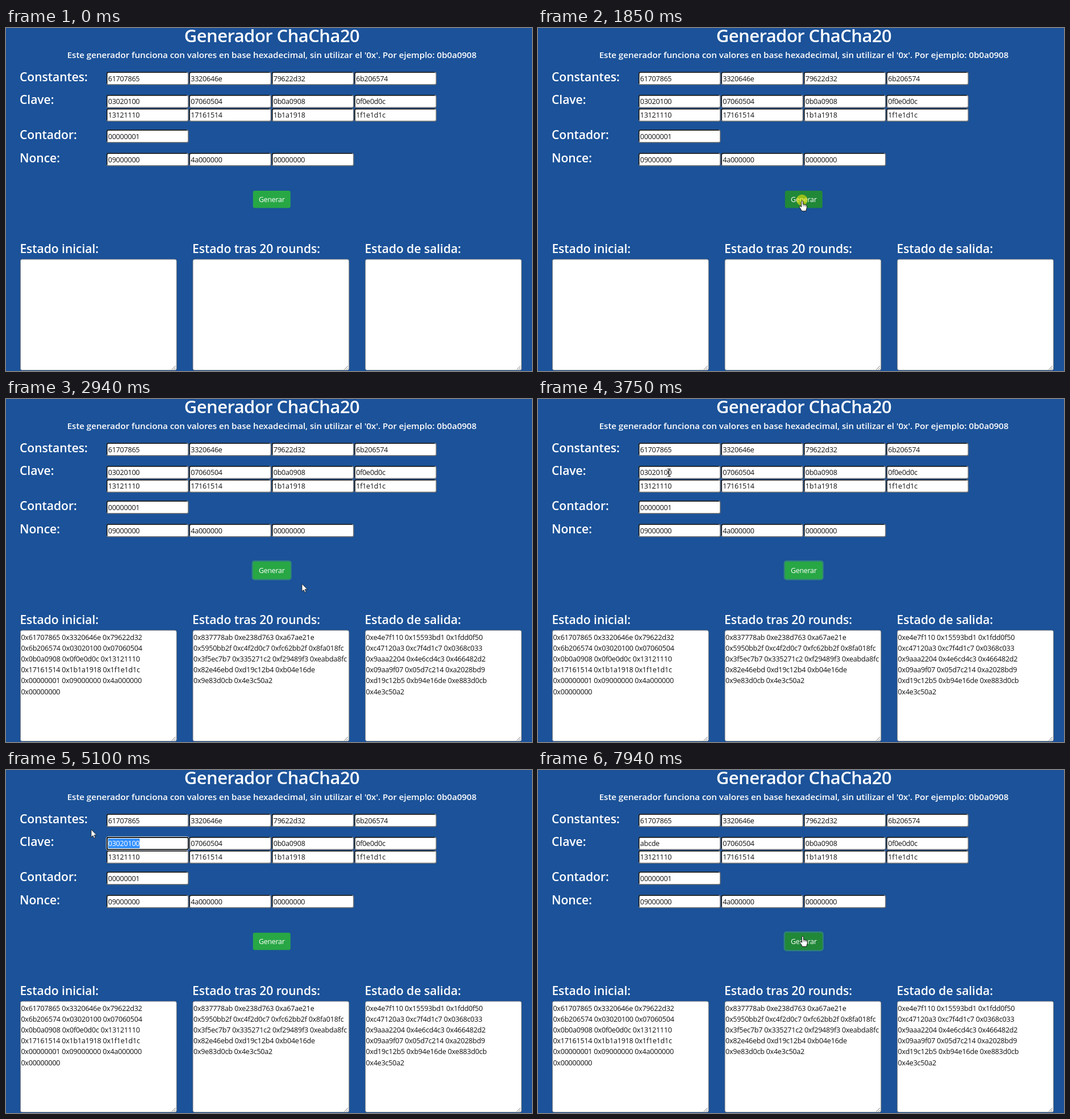
Write an HTML page that moves like this. It is 926 by 605 pixels and loops after 8000 ms.

```html
<!DOCTYPE html>
<html lang="es">
<head>
<meta charset="utf-8">
<title>Generador ChaCha20</title>
<style>
html, body { margin: 0; width: 100%; height: 100%; overflow: hidden; background: #1b5299; }
svg { display: block; width: 926px; height: 605px; }
text { font-family: "Open Sans", "Noto Sans", sans-serif; white-space: pre; }
.title { font-size: 31px; font-weight: 600; letter-spacing: -.55px; fill: #fff; text-anchor: middle; }
.sub { font-size: 15.2px; font-weight: 600; letter-spacing: -.07px; fill: #fff; text-anchor: middle; }
.label { font-size: 21.2px; font-weight: 600; letter-spacing: -.1px; fill: #fff; }
.value { font-size: 12.6px; letter-spacing: -.25px; fill: #111; }
.btn { font-size: 12.4px; letter-spacing: -.25px; fill: #fff; text-anchor: middle; }
</style>
</head>
<body>
<svg id="stage" viewBox="0 0 926 605"></svg>
<script>
const NS = 'http://www.w3.org/2000/svg';
const stage = document.getElementById('stage');
const LOOP = 8000, TICK = 80;

function add(tag, attrs, parent = stage) {
  const el = document.createElementNS(NS, tag);
  for (const k in attrs) el.setAttribute(k, attrs[k]);
  parent.appendChild(el);
  return el;
}
function write(cls, x, y, str, parent) {
  const el = add('text', { class: cls, x, y }, parent);
  el.textContent = str;
  return el;
}
const show = (el, on) => el.setAttribute('visibility', on ? 'visible' : 'hidden');
const clamp = (v, lo, hi) => Math.max(lo, Math.min(hi, v));

// ChaCha20 block: the state after 20 rounds
function rounds(state) {
  const s = Uint32Array.from(state);
  const mix = (a, b, d, n) => {
    s[a] += s[b];
    s[d] ^= s[a];
    s[d] = s[d] << n | s[d] >>> 32 - n;
  };
  const quarter = (a, b, c, d) => {
    mix(a, b, d, 16); mix(c, d, b, 12);
    mix(a, b, d, 8); mix(c, d, b, 7);
  };
  for (let r = 0; r < 20; r++)
    for (let i = 0; i < 4; i++) {
      const k = r % 2;
      quarter(i, 4 + (i + k) % 4, 8 + (i + 2 * k) % 4, 12 + (i + 3 * k) % 4);
    }
  return s;
}

// Form
add('rect', { width: 926, height: 605, fill: '#1b5299' });
write('title', 468, 25, 'Generador ChaCha20');
write('sub', 468, 53, "Este generador funciona con valores en base hexadecimal, sin utilizar el '0x'. Por ejemplo: 0b0a0908");

const rows = [
  [77.5, 'Constantes:', '61707865 3320646e 79622d32 6b206574'],
  [118, 'Clave:', '03020100 07060504 0b0a0908 0f0e0d0c'],
  [142, '', '13121110 17161514 1b1a1918 1f1e1d1c'],
  [179.5, 'Contador:', '00000001'],
  [220.5, 'Nonce:', '09000000 4a000000 00000000']
];
const fields = [], texts = [];
rows.forEach(([y, name, line]) => {
  write('label', 24, y + 16, name);
  line.split(' ').forEach((word, i) => {
    const x = 177 + i * 145.5;
    fields.push([x, y, 144.5, 23]);
    add('rect', { x: x + .7, y: y + .7, width: 143.1, height: 21.6, rx: 2.5, fill: '#fff', stroke: '#767676', 'stroke-width': 1.4 });
    add('path', { d: `M${x + .7} ${y + 20.5}v-17.3q0-2.5 2.5-2.5h138`, fill: 'none', stroke: '#111', 'stroke-width': 1.4 });
    texts.push(write('value', x + 2.7, Math.round(y + 16.2), word));
  });
});

// The key field that gets edited
const KEY = '03020100', KEY_X = 179.7, PITCH = 6.95;
const keyText = texts[4];
const focusBox = add('g', { fill: 'none' });
add('rect', { x: 176.5, y: 117.5, width: 145.5, height: 24, rx: 3.5, stroke: '#dfe7f2' }, focusBox);
add('rect', { x: 177.7, y: 118.7, width: 143.1, height: 21.6, rx: 2.5, stroke: '#000', 'stroke-width': 1.6 }, focusBox);
const selBox = add('rect', { y: 121, height: 17, fill: '#3390ff' });
stage.appendChild(keyText);
keyText.textContent = '';
const parts = ['#111', '#fff', '#111'].map(fill => add('tspan', { fill }, keyText));
const caret = add('rect', { y: 122, width: 1, height: 15, fill: '#000' });

// Button
const ring = add('rect', { x: 432.6, y: 284.8, width: 70.2, height: 34.6, rx: 5, fill: '#48b461', 'fill-opacity': .5 });
const button = add('rect', { x: 434.8, y: 287, width: 66, height: 30.4, rx: 3.2 });
write('btn', 467.7, 307, 'Generar');

// Results, wrapped at the inner width of each box
const first = Uint32Array.from(rows.map(r => r[2]).join(' ').split(' '), w => parseInt(w, 16));
const mixed = rounds(first);
const last = mixed.map((v, i) => v + first[i]);
const output = add('g', {});
function fillBox(x, state) {
  let y = 424.6, line = write('value', x, y, '', output);
  state.forEach(v => {
    const word = '0x' + v.toString(16).padStart(8, '0'), old = line.textContent;
    line.textContent = old ? old + ' ' + word : word;
    if (line.getComputedTextLength() > 273) {
      line.textContent = old;
      line = write('value', x, y += 19.2, word, output);
    }
  });
}
const textAreas = [];
[['Estado inicial:', first], ['Estado tras 20 rounds:', mixed], ['Estado de salida:', last]].forEach(([name, state], i) => {
  const x = 25 + i * 303.6;
  const label = write('label', x - .6, 396.5, name);
  const box = add('rect', { x: x + .4, y: 408, width: 274.9, height: 195.6, rx: 3, fill: '#fff', stroke: '#767676', 'stroke-width': .9 });
  add('path', { d: `M${x + 267} 602.5l6.5-6.5m-3 6.5l3-3`, stroke: '#666', 'stroke-width': .9 });
  stage.insertBefore(box, output);
  textAreas.push([x, 408, 275, 196], [x, 375, label.getComputedTextLength(), 27]);
  fillBox(x + 1.4, state);
});
stage.appendChild(output);

// Pointers
const halo = add('circle', { cx: 464.7, cy: 303.5, r: 9.8, fill: '#f6ec00' });
const pointer = { arrow: add('g', {}), hand: add('g', {}), beam: add('g', {}) };
add('path', { d: 'M0 0V13.4L3.1 10.6 5.1 15.2 7.2 14.3 5.2 9.8H9.4Z', fill: '#fff', stroke: '#111', 'stroke-width': .8 }, pointer.arrow);
add('path', { d: 'M-1.4 1.2Q0-.8 1.4 1.2V6.2L6.6 7.4Q8.3 8 8.3 9.8V12.6L6.6 18.4H-.4L-4.8 11.2Q-5.2 9.2-3.4 9.4L-1.4 11.2Z', fill: '#fff', stroke: '#111' }, pointer.hand);
add('path', { d: 'M1.6 6.6V10M4 7.2V10.2M6.2 8V10.6', stroke: '#333', 'stroke-width': .7 }, pointer.hand);
add('path', { d: 'M-3-6.5H3M0-6.5V6.5M-3 6.5H3', fill: 'none', stroke: '#111' }, pointer.beam);

// Each move: start, end, destination
const START = [844, 596];
const moves = [
  [70, 820, 483, 334],
  [900, 1300, 465, 304.5],
  [2700, 2860, 524, 390],
  [2860, 2940, 521, 326],
  [2940, 3590, 277, 131.5],
  [3670, 4070, 148, 127],
  [4070, 4230, 157, 127],
  [4230, 4390, 262, 130],
  [4550, 5100, 150, 105],
  [7060, 7140, 152, 120],
  [7140, 7700, 532, 303],
  [7700, 7940, 466, 293]
];
function locate(t) {
  let [x, y] = START;
  for (const [from, to, toX, toY] of moves) {
    if (t < from) break;
    const steps = Math.round((to - from) / TICK);
    const p = Math.min(1, Math.floor((t - from) / (to - from) * steps + .02) / steps);
    const ease = p * (2 - p);
    x += (toX - x) * ease;
    y += (toY - y) * ease;
  }
  return [x, y];
}

const inside = (x, y, [l, t, w, h]) => x >= l && x <= l + w && y >= t && y <= t + h;
const buttonArea = [435, 287, 66, 30];
const beamAreas = [...fields, ...textAreas];

const RESULT = 2010, FOCUS = 3830, RELEASE = 4230, REDRAG = 4550, BLUR = 7940;
const typed = [5810, 5890, 6050, 6210, 6730];

// Dragging left selects from the pointer to the anchor
function selection(t, x) {
  if (t < FOCUS || t >= typed[0]) return [0, 0];
  const end = t < REDRAG ? 4 : 8;
  const at = t >= RELEASE && t < REDRAG ? 0 : Math.round((x - KEY_X) / PITCH);
  return [clamp(at, 0, end), end];
}

function draw(t) {
  const [x, y] = locate(t);
  const hover = inside(x, y, buttonArea);
  const kind = hover ? 'hand' : beamAreas.some(r => inside(x, y, r)) ? 'beam' : 'arrow';
  for (const k in pointer) {
    show(pointer[k], k === kind && t >= moves[0][0]);
    pointer[k].setAttribute('transform', `translate(${x.toFixed(1)} ${y.toFixed(1)})`);
  }

  button.setAttribute('fill', hover ? '#218838' : '#28a745');
  show(ring, (t >= RESULT && t < FOCUS) || t >= BLUR);
  show(output, t >= RESULT);
  show(halo, t >= 1850 && t < 2490);
  halo.setAttribute('fill-opacity', .55 * clamp((2490 - t) / 400, 0, 1));

  const focused = t >= FOCUS && t < BLUR;
  show(focusBox, focused);
  const value = t < typed[0] ? KEY : 'abcde'.slice(0, typed.filter(k => k <= t).length);
  const [from, to] = selection(t, x);
  selBox.setAttribute('x', KEY_X + from * PITCH);
  selBox.setAttribute('width', (to - from) * PITCH);
  [value.slice(0, from), value.slice(from, to), value.slice(to)]
    .forEach((s, i) => { parts[i].textContent = s; });
  show(caret, focused && t >= typed[0]);
  caret.setAttribute('x', Math.round(KEY_X + keyText.getComputedTextLength()));
}

const begin = performance.now();
function frame() {
  draw((performance.now() - begin) % LOOP);
  requestAnimationFrame(frame);
}
draw(0);
requestAnimationFrame(frame);
</script>
</body>
</html>
```
